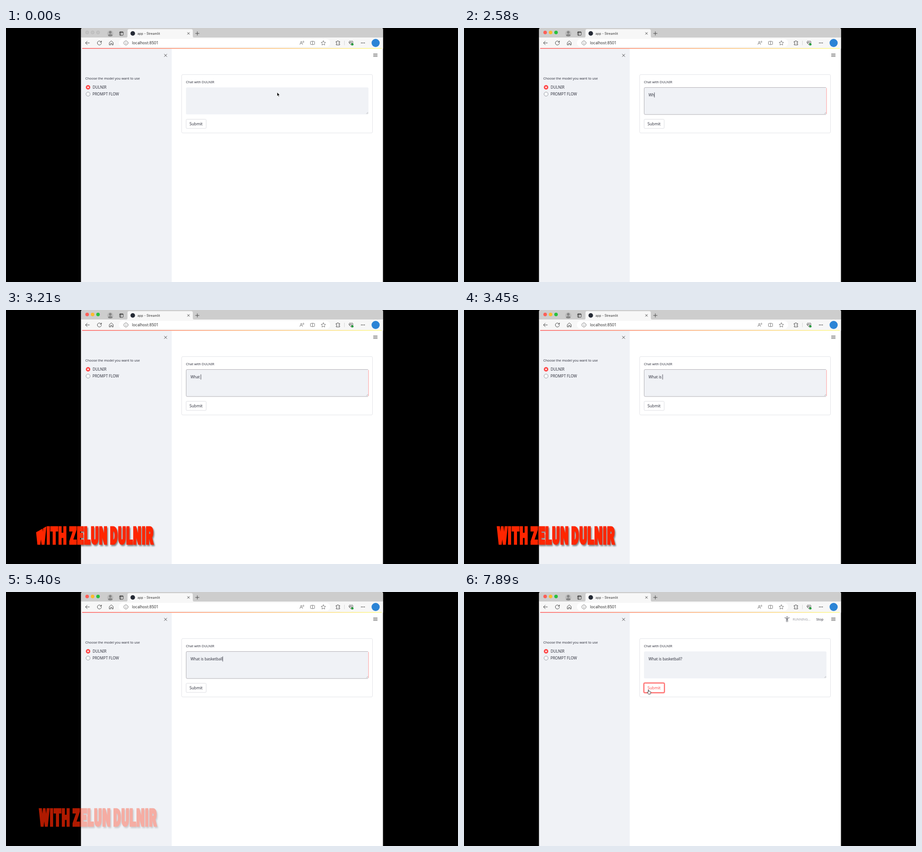
These frames come from a looping animation (997x561 px, 8 s). An HTML page:

```html
<!DOCTYPE html>
<html lang="en">
<head>
<meta charset="utf-8">
<title>Chat demo</title>
<style>
  html, body { margin: 0; width: 100%; height: 100%; overflow: hidden; background: #000; }
  svg { display: block; width: 100vw; height: 100vh; }
  text { font-family: "Noto Sans", "Open Sans", sans-serif; font-size: 8.3px; fill: #31333f; white-space: pre; }
  .ui { font-family: Inter, Roboto, sans-serif; fill: #333; }
  .small { font-size: 7.4px; }
  .icon { fill: none; stroke: #444; stroke-width: 1; stroke-linecap: round; stroke-linejoin: round; }
  .soft { stroke: #777; }

  /* hard switches */
  .lights, .focus, .arrow, .beam, .hand, .hover, .ring, .status { animation: 8s step-end infinite; }
  .lights { animation-name: lights; }
  .focus { animation-name: focus; }
  .arrow { animation-name: arrow; }
  .beam { animation-name: beam; }
  .hand, .hover { animation-name: hover; }
  .ring { animation-name: ring; }
  .status { animation-name: status; }
  @keyframes lights { 0% { opacity: 0 } 11.625%, 100% { opacity: 1 } }
  @keyframes focus { 0% { opacity: 0 } 12% { opacity: 1 } 94.5%, 100% { opacity: 0 } }
  @keyframes arrow { 0% { opacity: 1 } 12% { opacity: 0 } 78% { opacity: 1 } 83.3% { opacity: 0 } 85.1% { opacity: 1 } 85.5%, 100% { opacity: 0 } }
  @keyframes beam { 0% { opacity: 0 } 12% { opacity: 1 } 28.8% { opacity: 0 } 75.7% { opacity: 1 } 78% { opacity: 0 } 83.3% { opacity: 1 } 85.1%, 100% { opacity: 0 } }
  @keyframes hover { 0% { opacity: 0 } 85.5%, 100% { opacity: 1 } }
  @keyframes ring { 0% { opacity: 0 } 94.5%, 100% { opacity: 1 } }
  @keyframes status { 0% { opacity: 0 } 96%, 100% { opacity: 1 } }

  .pointer { animation: move 8s linear infinite; }
  @keyframes move {
    0%, 11.6% { transform: translate(598px, 142px) }
    12%, 75.7% { transform: translate(598px, 144px) }
    78.4% { transform: translate(590px, 124px) }
    81.2%, 81.6% { transform: translate(564px, 101px) }
    83.3% { transform: translate(515px, 132px) }
    85.5% { transform: translate(411px, 217px) }
    88%, 100% { transform: translate(407px, 216px) }
  }

  .caption { filter: drop-shadow(2px 3px 1.5px rgba(0, 0, 0, .45)); }
  .slide { animation: slide 8s linear infinite; }
  .edge { animation: edge 8s linear infinite; }
  .title {
    font: 900 50px Roboto, "Liberation Sans", sans-serif; font-kerning: none;
    letter-spacing: 3px; word-spacing: -5px;
    fill: #ff2600; stroke: #ff2600; stroke-width: 5px;
  }
  @keyframes slide {
    0%, 29.6% { transform: translateX(-270px); animation-timing-function: cubic-bezier(.5, 0, .4, 1) }
    42.1%, 100% { transform: none }
  }
  @keyframes edge {
    0%, 38.6% { transform: none; animation-timing-function: ease-out }
    42%, 100% { transform: translateX(-115px) }
  }
  /* linear-light fade: slower over black, faster over white */
  .on-dark { animation: dark 8s linear infinite; }
  .on-light { animation: light 8s linear infinite; }
  @keyframes dark { 0%, 61.9% { opacity: 1 } 67.9% { opacity: .67 } 73.9%, 100% { opacity: 0 } }
  @keyframes light { 0%, 61.9% { opacity: 1 } 67.9% { opacity: .29 } 73.9%, 100% { opacity: 0 } }
</style>
</head>
<body>
<svg viewBox="0 0 997 561">
  <defs>
    <linearGradient id="bar"><stop stop-color="#ff4b4b"/><stop offset="1" stop-color="#fffd80"/></linearGradient>
    <clipPath id="wipe"><path class="edge" d="M176 470H700V530H70Z"/></clipPath>
    <mask id="fade" maskUnits="userSpaceOnUse" x="0" y="0" width="997" height="561">
      <rect class="on-dark" width="165.500" height="561" fill="#fff"/>
      <rect class="on-light" x="165.500" width="831.500" height="561" fill="#fff"/>
    </mask>
  </defs>
  <rect width="997" height="561"/>

  <!-- browser window -->
  <path d="M165.600 561V3Q165.600 0 168.600 0H828.500Q831.500 0 831.500 3V561Z" fill="#fff"/>
  <path d="M165.600 22V3Q165.600 0 168.600 0H828.500Q831.500 0 831.500 3V22Z" fill="#cdcdcd"/>
  <rect x="165.600" y="21" width="665.900" height="24.500" fill="#f7f7f7"/>
  <path d="M264 21.500Q268 21.500 268 17.500V6Q268 2.500 271.500 2.500H408.500Q412 2.500 412 6V17.500Q412 21.500 416 21.500Z" fill="#f7f7f7"/>
  <rect x="249" y="24" width="466" height="17.500" rx="8.700" fill="#fff"/>
  <rect x="165.600" y="45.500" width="199.900" height="515.500" fill="#f0f2f6"/>
  <rect x="168" y="44.400" width="661" height="1.400" fill="url(#bar)"/>
  <path d="M829.500 47V561" stroke="#f2f2f2"/>

  <g fill="#c4c4c4" stroke="#b0b0b0" stroke-width=".7">
    <circle cx="179" cy="9.800" r="3.500"/><circle cx="191" cy="9.800" r="3.500"/><circle cx="203" cy="9.800" r="3.500"/>
  </g>
  <g class="lights">
    <circle cx="179" cy="9.800" r="3.900" fill="#fe5f57"/>
    <circle cx="191" cy="9.800" r="3.900" fill="#febb2e"/>
    <circle cx="203" cy="9.800" r="3.900" fill="#28c13f"/>
  </g>
  <circle cx="230" cy="12" r="6.800" fill="#bcbcbc"/>
  <circle cx="230" cy="9.500" r="2.900" fill="#858585"/>
  <path d="M225 17.200Q225 13.500 230 13.500T235 17.200Q230 20 225 17.200Z" fill="#858585"/>
  <g class="icon" stroke="#222">
    <rect x="250.500" y="8.300" width="8" height="8" rx="1.500"/>
    <path d="M250.500 9.500H258.500M252.800 10V16" stroke-width="1.300"/>
  </g>
  <circle cx="279.600" cy="12" r="5" fill="#252a35"/>
  <text class="ui" x="290" y="14.500" style="font-size:7.1px">app - Streamlit</text>
  <g class="icon">
    <path d="M400.300 9.800L404.700 14.200M404.700 9.800L400.300 14.200M422 8V16M418 12H426"/>
    <path d="M184 33H175.500M179.300 29L175.300 33L179.300 37"/>
    <path d="M210 31A4.500 4.500 0 1 0 210.500 33.500M210.600 28.500V31.300H207.700"/>
    <path d="M228.200 32L232.300 28.400L236.400 32V37.300H233.800V34H230.800V37.300H228.200Z"/>
    <g class="soft"><circle cx="264.600" cy="33" r="4.600"/><path d="M264.600 32.600V35.200M264.600 30.800V30.900"/></g>
  </g>
  <text class="ui" x="278" y="36" style="font-size:8.4px">localhost:8501</text>
  <g class="icon soft">
    <path d="M648.200 36.500L651.200 29L654.200 36.500M649.300 34H653.100M654.700 29.300Q655.700 30.500 654.700 31.700M656.400 28.500Q658 30.500 656.400 32.500" stroke-width=".9"/>
    <path d="M675.200 29.500H672.500Q671.500 29.500 671.500 30.500V35.500Q671.500 36.500 672.500 36.500H675.200M677 29.500H679.700Q680.700 29.500 680.700 30.500V35.500Q680.700 36.500 679.700 36.500H677M676.100 28.700V37.300"/>
    <path d="M700 28.200L701.500 31.400L705 31.800L702.400 34.200L703.100 37.700L700 36L696.900 37.700L697.600 34.200L695 31.800L698.500 31.400Z"/>
  </g>
  <g class="icon">
    <path d="M728.500 29.800H730.500Q730.500 28.300 732 28.300T733.500 29.800H736V32Q734 32 734 33.300T736 34.600V37.300H728.500V35Q730 34.800 730 33.400T728.500 32Z"/>
    <path d="M761 37.200L757.300 33.300Q755.800 31 757.500 29.300Q759.500 27.800 761 30Q762.500 27.800 764.500 29.300Q766.200 31 764.700 33.300ZM757 32.600H759.300L760.500 31L762 34L763 32.600"/>
    <path d="M746.500 28.500V37.500" stroke="#d5d5d5"/>
  </g>
  <circle cx="764" cy="36" r="2.600" fill="#249b3c"/>
  <g fill="#333"><circle cx="784" cy="33" r=".9"/><circle cx="787.300" cy="33" r=".9"/><circle cx="790.600" cy="33" r=".9"/></g>
  <circle cx="815.300" cy="33" r="9" fill="#2b84d6"/>

  <!-- sidebar -->
  <path class="icon" d="M349.200 57.700L354.800 63.300M354.800 57.700L349.200 63.300"/>
  <text class="small" x="175" y="113.500">Choose the model you want to use</text>
  <circle cx="181" cy="131" r="4.900" fill="#ff4b4b"/><circle cx="181" cy="131" r="1.800" fill="#fff"/>
  <circle cx="181" cy="146" r="4.500" fill="#f7f8fa" stroke="#8f929a" stroke-width=".9"/>
  <text x="191" y="133.800">DULNIR</text>
  <text x="190.700" y="149.200">PROMPT FLOW</text>

  <!-- form -->
  <path class="icon" d="M810.500 57.200H819M810.500 60H819M810.500 62.800H819"/>
  <rect x="387.500" y="102.800" width="421" height="129" rx="2.500" fill="#fff" stroke="#e2e3e7"/>
  <text class="small" x="397" y="121.900">Chat with DULNIR</text>
  <rect x="397" y="131.300" width="402.500" height="59.500" rx="2.500" fill="#f0f2f6"/>
  <g class="focus" fill="none">
    <path d="M798.500 131.400H399.900Q397.400 131.400 397.400 133.900V188.600Q397.400 191.100 399.900 191.100H798.500" stroke="#aaa5ac" stroke-width=".9"/>
    <path d="M799.700 132.500V190" stroke="#ff9a9a"/>
  </g>
  <path d="M795 189.500L798.500 186M797.300 189.500L798.500 188.300" stroke="#999" stroke-width=".7"/>
  <text id="typed" x="407" y="151.100"></text>
  <path id="caret" d="M0 142.300V153.500" stroke="#31333f" stroke-width=".9"/>

  <rect x="397.300" y="201.600" width="44.200" height="20.300" rx="2" fill="#fff" stroke="#dcdde2"/>
  <rect class="ring" x="396.600" y="200.800" width="45.600" height="22" rx="2.500" fill="none" stroke="#ff8c8c" stroke-width="2.600"/>
  <text x="419.200" y="214.700" text-anchor="middle" style="font-size:8.7px">Submit</text>
  <g class="hover">
    <rect x="397.300" y="201.600" width="44.200" height="20.300" rx="2" fill="#fff" stroke="#ff4b4b"/>
    <text x="419.200" y="214.700" text-anchor="middle" style="font-size:8.7px;fill:#ff4b4b">Submit</text>
  </g>

  <g class="status">
    <circle cx="712.600" cy="55" r="1.500" fill="#8b8c93"/>
    <path d="M707.700 56.700L711 58H714.200L717.500 56.700M711.300 58.300V65.700M713.900 58.300V65.700M712.600 58V62" class="icon" style="stroke:#8b8c93;stroke-width:1.500"/>
    <text x="725" y="62.700" style="font-size:7.1px;fill:#9a9ba2">RUNNING...</text>
    <text x="777" y="62.700" style="font-size:7.5px">Stop</text>
  </g>

  <g mask="url(#fade)"><g class="caption"><g clip-path="url(#wipe)"><g class="slide">
    <text class="title" transform="translate(73.500 515.700) scale(.5 1)">WITH ZELUN DULNIR</text>
  </g></g></g></g>

  <g class="pointer">
    <path class="arrow" d="M0 0V8.500L1.900 6.800L3.200 9.700L4.600 9.100L3.300 6.300H5.900Z" fill="#000" stroke="#fff" stroke-width=".7"/>
    <path class="beam" d="M-1.700 -4.500Q0 -4.500 0 -3.300Q0 -4.500 1.700 -4.500M0 -3.300V3.300M-1.700 4.500Q0 4.500 0 3.300Q0 4.500 1.700 4.500M-1 .8H1" fill="none" stroke="#333" stroke-width=".9"/>
    <path class="hand" d="M-.8 .8Q0 -.4 .8 .8V3.400Q1.700 2.700 2.300 3.600Q3.200 3 3.700 4Q4.800 3.700 4.900 4.900V6.700Q4.800 8.200 4 9.500H-.3Q-1.400 7.700 -2.800 6.100Q-2.600 4.600 -.8 5.700Z" fill="#fff" stroke="#222" stroke-width=".9"/>
  </g>
</svg>
<script>
  const LOOP = 8000, PROMPT = "What is basketball?", BLINK = 500;
  const FOCUS = 960, BLUR = 7560;
  // moment each character is typed
  const keys = [2400, 2520, 2670, 2850, 3120, 3240, 3360, 3420, 3780, 3990,
                4110, 4290, 4380, 4470, 4560, 4650, 4950, 5130, 5760];
  const typed = document.getElementById("typed");
  const caret = document.getElementById("caret");

  function draw() {
    const t = performance.now() % LOOP;
    const count = keys.filter(k => k <= t).length;
    const text = PROMPT.slice(0, count);
    if (typed.textContent !== text) typed.textContent = text;

    const since = t - (count ? keys[count - 1] : FOCUS);
    const on = t >= FOCUS && t < BLUR && Math.floor(since / BLINK) % 2 === 0;
    const x = 407.2 + (count ? typed.getComputedTextLength() : 0);
    caret.setAttribute("transform", `translate(${x} 0)`);
    caret.style.opacity = on ? 1 : 0;
    requestAnimationFrame(draw);
  }
  draw();
</script>
</body>
</html>
```
